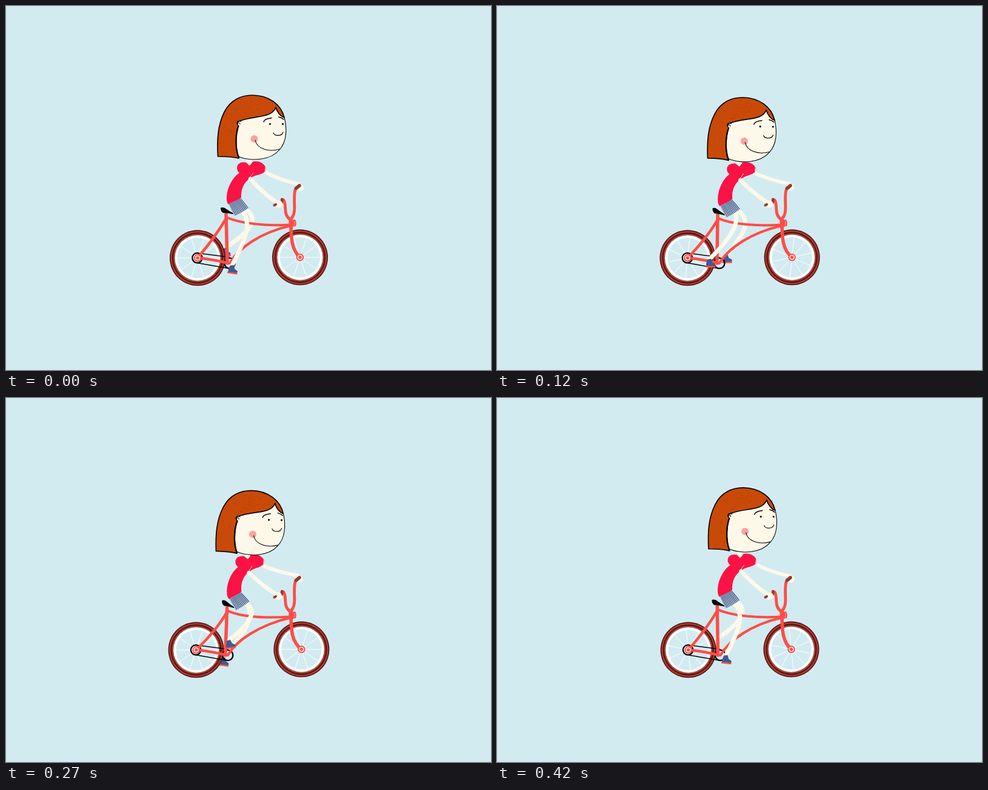
These frames come from a looping animation (800 by 600 pixels, 0.45 s). An HTML page with a canvas:

```html
<!DOCTYPE html>
<html lang="en">
<head>
<meta charset="utf-8">
<title>Cyclist</title>
<style>
html, body { margin: 0; width: 100%; height: 100%; overflow: hidden; background: #d2ebf1; }
canvas { display: block; }
</style>
</head>
<body>
<canvas id="stage" width="800" height="600"></canvas>
<script>
const ctx = document.getElementById('stage').getContext('2d');
const LOOP = 450, STEP = 30, TAU = Math.PI * 2, RAD = Math.PI / 180;
const SKY = '#d2ebf1', RED = '#ff4d47', SKIN = '#fef8e9', INK = '#080404';
const SHIRT = '#fc1245', HAIR = '#c94a08', BLUE = '#405b91', GRIP = '#8f3d2d';

ctx.lineCap = ctx.lineJoin = 'round';

function line(d, color, width) {
  ctx.strokeStyle = color;
  ctx.lineWidth = width;
  ctx.stroke(new Path2D(d));
}
function shape(d, color) {
  ctx.fillStyle = color;
  ctx.fill(new Path2D(d));
}
function disc(x, y, r, color) {
  ctx.beginPath();
  ctx.arc(x, y, r, 0, TAU);
  ctx.fillStyle = color;
  ctx.fill();
}
function ring(x, y, r, color, width) {
  ctx.beginPath();
  ctx.arc(x, y, r, 0, TAU);
  ctx.strokeStyle = color;
  ctx.lineWidth = width;
  ctx.stroke();
}
// Runs draw() turned about (x, y) and moved by (dx, dy).
function posed(x, y, dx, dy, deg, draw) {
  ctx.save();
  ctx.translate(x + dx, y + dy);
  ctx.rotate(deg * RAD);
  ctx.translate(-x, -y);
  draw();
  ctx.restore();
}

// Seeded hair specks
let seed = 7;
const rand = () => (seed = seed * 16807 % 2147483647) / 2147483647;
const specks = Array.from({ length: 260 }, () => [346 + rand() * 116, 146 + rand() * 104]);

const hair = 'M349.5 248 C348 221 349 197 360 175 C370 155 388 147 406 147 C433 147 454 162 459 184' +
  ' C453 182 447 175 445 167 C439 185 411 180 387 189 C379 204 377 232 384 251 C372 248 361 248 349.5 248 Z';
const jaw = 'C464 203 463 224 451 237 C437 254 405 257 383 248';
const face = `M387 188 C411 180 439 185 445 167 C447 175 453 182 459 183 ${jaw} C378 230 379 203 387 188 Z`;
const shirt = 'M381 267 C381 259 389 256 396 258 Q402 264 406 257 C416 254 426 259 428.5 267 L427 273' +
  ' C422 278 413 278 406 282 L400 286 C393 291 387 302 388 316 L367 327 C362 323 363 305 371 291' +
  ' C375 284 379 279 385 275 Q381 272 381 267 Z';
const hairPath = new Path2D(hair);

function wheel(x, y, turn) {
  disc(x, y, 46, '#64120f');
  disc(x, y, 44.4, '#9e4238');
  ring(x, y, 41, '#61100f', 2.2);
  disc(x, y, 38.6, '#a75c4e');
  disc(x, y, 37.4, '#fff');
  disc(x, y, 33.2, SKY);
  ctx.beginPath();
  for (let i = 0; i < 10; i++) {
    const a = turn + i * TAU / 10;
    ctx.moveTo(x, y);
    ctx.lineTo(x + 34 * Math.cos(a), y + 34 * Math.sin(a));
  }
  ctx.strokeStyle = '#fff';
  ctx.lineWidth = 1;
  ctx.stroke();
}

function hub(x, y) {
  disc(x, y, 6.2, RED);
  ring(x, y, 3.4, '#fff', 1.3);
}

// One leg: the knee swings with the pedal angle.
function leg(hx, hy, kx, ky, angle, bulge, swing) {
  const fx = kx + 15 * Math.cos(angle), fy = ky - 4 + 15 * Math.sin(angle);
  const ax = fx - 1, ay = fy - 7;
  const mx = 398 + bulge + swing * Math.cos(angle + 30 * RAD), my = 366 + 6 * Math.sin(angle);
  const cx = (8 * mx - hx - ax) / 6, cy = (8 * my - hy - ay) / 6;
  line(`M${hx} ${hy} C${cx + 3} ${cy - 10} ${cx - 3} ${cy + 10} ${ax} ${ay}`, SKIN, 7);
  ctx.save();
  ctx.translate(fx, fy);
  ctx.rotate(8 * RAD * Math.sin(angle));
  line('M-7 6 L7 6', RED, 3);
  shape('M-5 -6 L1 -7 L3 -1 L8 2 Q9 5 6 5 L-7 5 Q-8 1 -5 -6 Z', BLUE);
  ctx.restore();
}

function frame(p, rx, ry, fx, fy, kx, ky) {
  const sx = 363 + 2 * p, sy = 343 + 3 * p;
  ring(rx - 0.5, ry, 8.2, INK, 2.2);
  ring(kx, ky, 8.6, INK, 2.4);
  line(`M${rx} ${ry - 8} L${kx - 1} ${ky - 10}`, INK, 1.6);
  line(`M${rx - 2} ${ry + 8} L${kx - 2} ${ky + 8.5}`, INK, 1.6);
  line(`M${sx - 1} ${sy + 9} Q${sx - 18} ${sy + 38} ${rx} ${ry}`, RED, 4.5);
  line(`M${rx} ${ry} Q${rx + 24} ${ry + 2} ${kx - 2} ${ky}`, RED, 4.5);
  line(`M${sx} ${sy + 5} C${sx + 24} ${sy + 16} 430 363 470 360.5`, RED, 4);
  line(`M${kx} ${ky} C${kx + 15} 399 418 374 470 362`, RED, 4.2);
  line(`M${sx} ${sy} L${kx - 4} ${ky}`, RED, 5.5);
  hub(rx, ry);
  line(`M470 354 C470 383 471 402 ${fx} ${fy}`, RED, 5.5);
  hub(fx, fy);
}

function bars() {
  line('M470 354 L470 363', RED, 7);
  shape('M470 353 L477 352 Q480 357 478 363 L470 364 Z', RED);
  line('M475.5 355 Q477 358 475.5 361', '#ff9c92', 1.2);
  line('M469 352 C457 344 463 332 459 322 Q458 319 455 319', RED, 4.8);
  line('M469 352 C480 342 474 326 476 310 Q476 302 480 299', RED, 4.8);
  line('M478.5 300.5 L484 296', GRIP, 5.5);
  line('M455.5 319 L454.5 324', GRIP, 4.5);
}

function saddle(p) {
  posed(364, 339, 2 * p, 2.5 * p, 7 * p, () =>
    shape('M354 333 Q356 331 361 333 Q368 338 374 341 Q376 343 374 343 Q366 341 358 341 Q354 338 354 333 Z', INK));
}

function skirt() {
  const d = 'M368 327 L386 316 Q394 323 400 333 Q389 341 377 346 Q372 336 368 327 Z';
  shape(d, '#bccbdf');
  ctx.save();
  ctx.clip(new Path2D(d));
  for (let i = 0; i <= 10; i++) {
    const k = i / 10;
    line(`M${368 + 18 * k} ${327 - 11 * k} L${377 + 23 * k} ${347 - 13 * k}`, '#3d547f', 1.2);
  }
  ctx.restore();
}

function torso(p) {
  posed(376, 322, p, 5 * p, -4.4 * p, () => {
    skirt();
    line('M401 252 L401 261', SKIN, 9);
    shape(shirt, SHIRT);
    shape('M396 257 L407 256 Q404 262 401 263 Z', SKIN);
    line('M428 266 L427 273', '#ffa5af', 1.3);
    line('M408 275 L402 283', '#ffa5af', 1);
  });
}

function head(p) {
  posed(405, 200, -2.5 * p, 7 * p, 1.6 * p, () => {
    shape(face, SKIN);
    line(`M459 183 ${jaw}`, INK, 1.1);
    shape(hair, HAIR);
    ctx.save();
    ctx.clip(hairPath);
    for (const [x, y] of specks) disc(x, y, 0.5, '#8c3206');
    ctx.restore();
    line(hair, INK, 1.7);
    line('M387 190 C378 205 377 232 384 250', INK, 2.2);
    disc(384.5, 193, 4, INK);
    disc(386, 194, 3.4, SKIN);
    line('M383 193 Q386 191 386 195', INK, 1);
    disc(409.5, 219, 6, '#f8a39f');
    line('M411 221 C414 236 434 241 451 236', INK, 1.1);
    line('M441 209 C443 215 455 215 457 208', INK, 1.1);
    line('M425 191 Q426 186 438 184.5', INK, 1.5);
    line('M450 183 Q455 184 458 187', INK, 1.5);
    disc(435.5, 194.5, 1.6, INK);
    disc(456.5, 194.5, 1.6, INK);
  });
}

function draw(ms) {
  const u = ms / LOOP;
  const p = 1 - Math.abs(1 - 2 * u);
  const turn = u * TAU, pedal = turn + 70 * RAD;
  const rx = 316 - 3 * p, ry = 415.3, fx = 485 + 3 * p, fy = 414.3;
  const kx = 369 - 4 * p, ky = 424;

  ctx.fillStyle = SKY;
  ctx.fillRect(0, 0, 800, 600);

  leg(396 + p, 336 + 2 * p, kx - 2, ky, pedal + Math.PI, 5, 6);
  wheel(rx, ry, turn);
  wheel(fx, fy, turn);
  frame(p, rx, ry, fx, fy, kx, ky);
  line(`M${427 - 4 * p} ${273 + 4 * p} Q448 ${286 + p} ${483 - 2 * p} ${293.5 - p}`, SKIN, 6);
  disc(485 - 2 * p, 299 - p, 6, SKIN);
  bars();
  saddle(p);
  leg(390 + 4 * p, 337 + 2 * p, kx, ky, pedal, 0, 8);
  torso(p);
  line(`M${403 - 3 * p} ${285 + 4 * p} Q${424 - p} ${309 + p} ${447 - p} 324`, SKIN, 6.5);
  disc(450 - p, 326.5, 6, SKIN);
  line('M442.5 328.5 L445 327', GRIP, 4);
  head(p);
}

function tick() {
  draw(Math.floor(performance.now() % LOOP / STEP) * STEP);
  requestAnimationFrame(tick);
}
tick();
</script>
</body>
</html>
```
